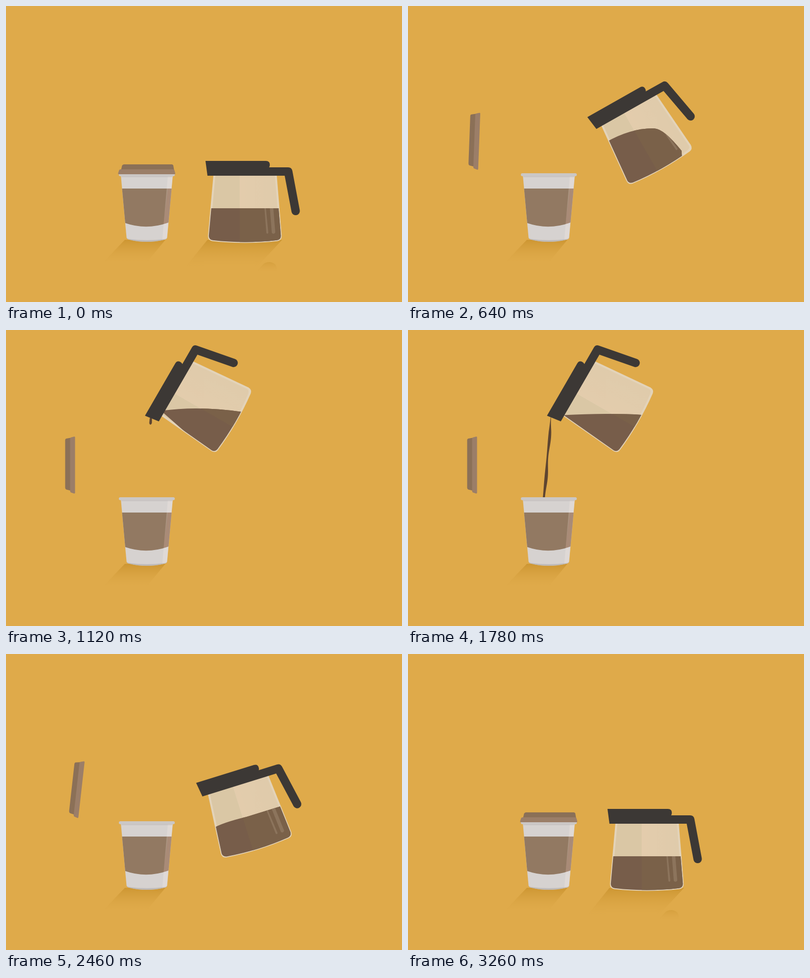
These frames come from a looping animation (800 by 600 pixels, 3.72 s). An HTML page with a canvas:

```html
<!DOCTYPE html>
<html lang="en">
<head>
<meta charset="utf-8">
<title>Coffee pour</title>
<style>
html, body { margin: 0; width: 100%; height: 100%; overflow: hidden; background: #dfaa4a; }
canvas { display: block; width: 100vw; height: 100vh; }
</style>
</head>
<body>
<canvas id="stage" width="800" height="600"></canvas>
<script>
const LOOP = 3720;
const ctx = document.getElementById('stage').getContext('2d');

const clamp = v => Math.max(0, Math.min(1, v));
const lerp = (a, b, k) => a + (b - a) * k;
const span = (t, a, b) => clamp((t - a) / (b - a));
const bezier = (s, a, b, end) => 3 * s * (1 - s) ** 2 * a + 3 * s * s * (1 - s) * b + s ** 3 * end;

// cubic-bezier(.42, 0, .58, 1)
function ease(x) {
  let lo = 0, hi = 1;
  for (let i = 0; i < 24; i++) {
    const mid = (lo + hi) / 2;
    if (bezier(mid, .42, .58, 1) < x) lo = mid; else hi = mid;
  }
  return bezier((lo + hi) / 2, 0, 1, 1);
}
const tween = (t, a, b) => ease(span(t, a, b));

function fill(path, style) {
  ctx.fillStyle = style;
  ctx.fill(typeof path === 'string' ? new Path2D(path) : path);
}
function gradient(x0, y0, x1, y1, from, to) {
  const g = ctx.createLinearGradient(x0, y0, x1, y1);
  g.addColorStop(0, from);
  g.addColorStop(1, to);
  return g;
}

const SHADE = 'rgba(205,150,50,1)', CLEAR = 'rgba(223,170,74,0)';

function drawShadows(potAlpha) {
  fill('M240 474H322L279 526L193 523Z', gradient(0, 474, 0, 525, SHADE, CLEAR));
  ctx.globalAlpha = potAlpha;
  fill('M407 474H558L500 536L360 532Z', gradient(0, 474, 0, 534, SHADE, CLEAR));
  fill('M507 537L520 523Q525 519 533 519Q547 521 547 533V541Z',
    gradient(0, 517, 0, 541, 'rgba(205,150,50,.6)', CLEAR));
  ctx.globalAlpha = 1;
}

const cupBody = new Path2D('M232 343H337L325.5 469Q325 472 321 473.5Q284 482.5 248 473.5Q244 472 243.5 469Z');

function drawCup() {
  fill(cupBody, '#d6d2d0');
  ctx.save();
  ctx.clip(cupBody);
  fill('M230 370H340V439H328Q284 455 241 440L230 438Z', '#927962');
  fill('M327 343H340V482H315Z', 'rgba(255,240,230,.22)');
  fill('M327 370H340V439H328L318 442Z', 'rgba(165,120,100,.32)');
  fill('M240 467Q245 472 250 472.5Q284 477 320 472.5Q324 472 330 467V485H240Z', 'rgba(175,170,168,.6)');
  ctx.restore();
  fill('M233 345H336V347H233Z', 'rgba(175,170,168,.35)');
  fill('M231 339H338Q341 339 341 342Q341 345 338 345H231Q228 345 228 342Q228 339 231 339Z', '#cbc7c5');
}

function drawLid(q) {
  ctx.save();
  ctx.translate(284.5 - 155 * q ** 1.2, 331 - 57.5 * (1 - (1 - q) ** 2));
  ctx.rotate(-q * Math.PI / 2);
  fill('M-52 1L-50 -7.5Q-49 -10 -46 -10H50Q53 -10 53.5 -7.5L55 1Z', '#8b7057');
  fill('M-52 0H52Q55.5 0 56 2.5L57.5 8.5Q57.5 10 56 10H-56Q-58.5 10 -58 8L-56 2Q-55.5 0 -52 0Z', '#9b7e68');
  ctx.restore();
}

// Liquid outline inside the carafe: wall, control, crest, control, wall, floor
const level = [400, 410, 445, 410, 480, 410, 520, 410, 566, 410, 566, 495];
const poured = [418, 338, 444.5, 379, 465.5, 415, 486, 450, 500, 478.5, 508, 495];
const surfaces = [
  [200, level],
  [640, [408, 377, 468, 376, 510, 401, 526, 411, 535, 467, 522, 495]],
  [1110, [428, 337, 450.5, 366, 468, 396.6, 490.5, 435.6, 507, 478, 512, 495]],
  [1780, poured],
  [1900, poured],
  [2140, [414, 359, 459.6, 380.6, 496.8, 424.7, 506, 446, 510, 476.6, 515, 495]],
  [2440, [406, 413, 426, 406, 480, 410, 520, 410, 566, 410, 566, 495]],
  [2600, level]
];

function surfaceAt(t) {
  let i = surfaces.findIndex(s => s[0] > t);
  if (i < 1) return level;
  const [t0, a] = surfaces[i - 1], [t1, b] = surfaces[i];
  const k = (t - t0) / (t1 - t0);
  return a.map((v, n) => lerp(v, b[n], k));
}

function glass(i) {
  return new Path2D(`M${419 + i} 343L${408 + i} 466Q${408 + i} ${475 - i} ${416 + i} ${476.5 - i}
    Q483 ${484 - i} ${549 - i} ${476.5 - i}Q${557 - i} ${475 - i} ${557 - i} 466L${547 - i} 343Z`);
}
const outer = glass(0), wet = glass(1.7), dry = glass(4);

function drawPot(t, r) {
  ctx.save();
  ctx.translate(480 + bezier(r, 16, -13.3, -88), 398 + bezier(r, -85, -205, -249));
  ctx.rotate(-r * Math.PI / 3);
  ctx.translate(-480, -398);

  fill(outer, '#e3d3b9');
  ctx.save();
  ctx.clip(dry);
  fill('M400 340H472V490H400Z', '#dac7a5');
  fill('M472 340H560V490H472Z', gradient(472, 0, 550, 0, '#e3ccac', '#dfcbab'));
  ctx.restore();

  const s = surfaceAt(t);
  const liquid = new Path2D();
  liquid.moveTo(s[0], s[1]);
  liquid.quadraticCurveTo(s[2], s[3], s[4], s[5]);
  liquid.quadraticCurveTo(s[6], s[7], s[8], s[9]);
  liquid.lineTo(s[10], s[11]);
  liquid.lineTo(396, 495);
  liquid.closePath();
  ctx.save();
  ctx.clip(wet);
  ctx.clip(liquid);
  fill('M390 330H570V500H390Z', '#775d4a');
  fill('M472 330H570V500H472Z', '#7a6149');
  fill('M522 409H525L530 460Q528 463 526 460Z', '#8c745c');
  fill('M533 409H540L544 459Q541 464 537 460Z', '#8c745c');
  ctx.restore();

  fill(`M403 314H525Q533 314 533 321.5Q533 325 531.5 327H570Q577 327 578.5 334L593.5 414
    A8.5 8.5 0 0 1 577 418L563 344H407Z`, '#3c3835');
  ctx.restore();
}

const TOP = 176, RIM = 341;
const fall = ms => ms <= 0 ? 0 : .18 * ms + .0012 * ms * ms;

// One ribbon of coffee between heights a and b
function ribbon(t, a, b, taper) {
  const end = Math.min(b, RIM);
  if (end - a < 1) return;
  const sway = 9 * Math.exp(-(t - 1065) / 60);
  const left = [], right = [];
  for (let y = a; ; y = Math.min(y + 2, end)) {
    const u = (y - 178) / 162;
    const wave = Math.sin((y - 198 - .4 * (t - 1780)) * Math.PI / 40);
    const x = 289 - 14 * u + sway + .5 * wave;
    const w = (2 + .7 * wave + .8 * u) * Math.sqrt(clamp((y - a + .5) / taper)) * Math.sqrt(clamp((b - y + .2) / 3));
    left.push([x - w, y]);
    right.unshift([x + w, y]);
    if (y >= end) break;
  }
  ctx.beginPath();
  left.concat(right).forEach(p => ctx.lineTo(p[0], p[1]));
  ctx.fillStyle = '#5e4530';
  ctx.fill();
}

function drawStream(t) {
  if (t < 1065 || t > 2400) return;
  const head = TOP + 2 + fall(t - 1065);
  const tail = TOP + 2 + fall(t - 2002);
  if (t < 2040) {
    ribbon(t, t < 2002 ? TOP : tail, head, t < 1300 ? 4 : 30);
    return;
  }
  const split = tail + 46;
  ribbon(t, tail, split, 4);
  ribbon(t, split + .35 * (t - 2040), head, 24);
}

function draw(t) {
  fill('M0 0H800V600H0Z', '#dfaa4a');
  const tilt = tween(t, 200, 1090) - tween(t, 1905, 2790);
  const lift = tween(t, 0, 720) - tween(t, 2280, 3250);
  drawShadows(1 - span(t, 200, 460) + span(t, 2480, 2700));
  drawStream(t);
  drawCup();
  drawLid(lift);
  drawPot(t, tilt);
}

const start = performance.now();
function tick() {
  draw((performance.now() - start) % LOOP);
  requestAnimationFrame(tick);
}
tick();
</script>
</body>
</html>
```
